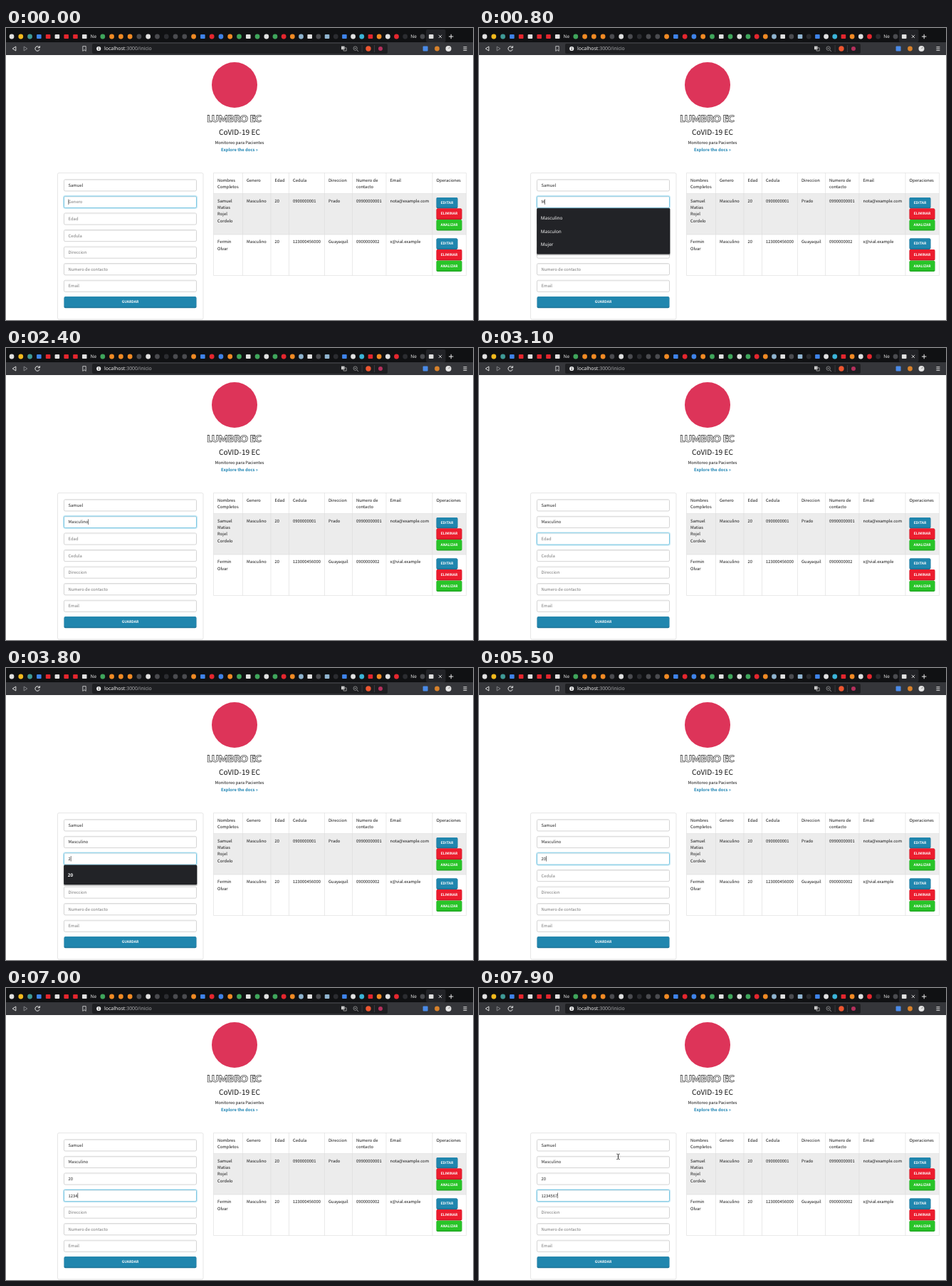
Animation of 656 by 410 pixels, one loop 8000 ms. Source, as an HTML page:

```html
<!DOCTYPE html>
<html lang="es">
<head>
<meta charset="utf-8">
<title>Registro de pacientes</title>
<style>
html, body { margin: 0; width: 100%; height: 100%; overflow: hidden; background: #fff; }
svg { display: block; width: 656px; height: 410px; }
text {
  font: 500 5.85px "Noto Sans CJK SC", "Noto Sans CJK JP", "Noto Sans CJK", Lato, sans-serif;
  text-rendering: geometricPrecision; fill: #111; white-space: pre;
}
.bold { font-weight: 700; }
.mid { text-anchor: middle; }
.ui { font-family: "Noto Sans", sans-serif; font-weight: 400; }
</style>
</head>
<body>
<svg id="stage" viewBox="0 0 656 410"></svg>
<script>
const LOOP = 8000;
const stage = document.getElementById('stage');

function el(tag, attrs, parent = stage) {
  const node = document.createElementNS('http://www.w3.org/2000/svg', tag);
  for (const key in attrs) node.setAttribute(key, attrs[key]);
  parent.appendChild(node);
  return node;
}
const rect = (x, y, width, height, fill, more, parent) =>
  el('rect', { x, y, width, height, fill, ...more }, parent);
const dot = (cx, cy, r, fill) => el('circle', { cx, cy, r, fill });
const path = (d, stroke, more, parent) =>
  el('path', { d, stroke, fill: 'none', 'stroke-width': 1, ...more }, parent);
function label(x, y, str, style = '', cls = '', parent = stage) {
  const node = el('text', { x, y, class: cls, style }, parent);
  node.textContent = str;
  return node;
}

// ---- Browser chrome ----
const tints = {
  w: '#e0e0e0', y: '#f2b91d', t: '#3f9a96', b: '#3f83e8', r: '#e3262e', g: '#3fa55b',
  o: '#f08a24', k: '#4a4b4f', d: '#2b2c30', c: '#3bb4d8', l: '#8fb4cf'
};
const tabs = 'wytbrwrrwNgoookwkdkkobrbogwgwgrolwkldbwcrowrdNkw';
const squares = 'b3,r4,w5,r6,r7,w8,w16,b21,w26,w33,l35,b37,r40,w47'.split(',');

function drawTabs() {
  rect(0, 0, 656, 38, '#101113');
  rect(590, 2, 27.5, 18, '#222327', { rx: 2 });
  [...tabs].forEach((code, i) => {
    const x = i < 29 ? 8 + 12.78 * i : 365.8 + 12.18 * (i - 28);
    if (code === 'N') label(x - 4.5, 14.3, 'Ne', 'font-size:6.5px;fill:#e4e4e4', 'ui');
    else if (squares.includes(code + i)) rect(x - 3.3, 9, 6.6, 6, tints[code], { rx: 1 });
    else dot(x, 12, 3.4, tints[code]);
  });
  path('M607.8 9.8l4.2 4.2m0-4.2l-4.2 4.2', '#ddd', { 'stroke-width': .9 });
  path('M622 12h6.4m-3.2-3.2v6.4', '#eee');
}

function drawToolbar() {
  rect(0, 20, 656, 18, '#35363a');
  rect(121, 22, 415, 14, '#1e1f22', { rx: 2 });
  path('M13.8 26v6l-4.6-3z', '#eee', { 'stroke-width': .9 });
  path('M25.2 26v6l4.6-3z', '#8b8c90', { 'stroke-width': .9 });
  path('M46.8 27.2a3.2 3.2 0 1 0 .4 2.8M47.4 25.2v2.6h-2.6', '#eee');
  path('M107.8 25.6h4.4v6.8l-2.2-1.8-2.2 1.8z', '#ddd', { 'stroke-width': .8 });
  dot(130.2, 29, 3.1, '#eee');
  rect(129.8, 27, .9, .9, '#222');
  rect(129.8, 28.5, .9, 2.5, '#222');
  const url = label(138, 31.3, '', 'font-size:6.95px', 'ui');
  for (const [str, fill] of [['localhost', '#f2f2f2'], [':3000/inicio', '#a9aaad']])
    el('tspan', { style: 'fill:' + fill }, url).textContent = str;

  rect(471, 25.6, 4.6, 4.6, '#ccc');
  path('M474 27.8h4.2v4.2H474z', '#aaa', { 'stroke-width': .8 });
  path('M493 31l2 2M489.4 28.6h2.6', '#aaa', { 'stroke-width': .8 });
  el('circle', { cx: 490.7, cy: 28.6, r: 2.7, fill: 'none', stroke: '#aaa', 'stroke-width': .7 });
  rect(499.8, 24, .5, 10, '#55565a');
  rect(517.2, 24, .5, 10, '#55565a');
  dot(509, 29, 3.7, '#ee5630');
  dot(526, 29, 3, '#b5305d');
  rect(585.6, 25.4, 7, 7, '#4a8be8', { rx: 1 });
  dot(605.5, 29, 3.4, '#d9822b');
  dot(621.5, 29, 4, '#e4e4e4');
  path('M621.5 29l2-2', '#555', { 'stroke-width': .8 });
  for (const y of [26.3, 28.6, 30.9]) rect(642.4, y, 5, .9, '#eee');
}

// ---- Page ----
function drawHeader() {
  dot(321, 80, 32, '#dd3459');
  label(320.5, 131.8, 'LUMBRO EC',
    'font:900 13.2px Lato,sans-serif;fill:#fff;stroke:#111;stroke-width:.6', 'mid');
  label(328, 150.4, 'CoVID-19 EC', 'font-size:10.2px', 'mid');
  label(328, 163.2, 'Monitoreo para Pacientes', '', 'mid');
  label(328, 172.7, 'Explore the docs »', 'fill:#1a82b2', 'mid bold');
}

function button(x, y, w, h, str, fill, edge) {
  rect(x, y, w, h, edge, { rx: 1.8 });
  rect(x + .4, y, w - .8, h - 1.6, fill, { rx: 1.5 });
  label(x + w / 2, y + h / 2 + 1.1, str, 'font-size:4.95px;fill:#fff', 'mid bold');
}

function drawTable() {
  const cols = [291.5, 332.5, 372, 397.5, 447.5, 486.5, 534, 599, 646.5];
  const rows = [203.5, 232.5, 290, 347.5];
  const cells = [
    ['Nombres/Completos', 'Genero', 'Edad', 'Cedula', 'Direccion', 'Numero de/contacto', 'Email', 'Operaciones'],
    ['Samuel/Matias/Rojel/Cordelo', 'Masculino', '20', '0900000001', 'Prado', '09900000001', 'nota@example.com'],
    ['Fermin/Olvar', 'Masculino', '20', '123000456000', 'Guayaquil', '0900000002', 'x@vial.example']
  ];
  rect(291.5, 232.5, 355, 57.5, '#ececec');
  const lines = cols.map(x => `M${x} 203.5V347.5`).concat(rows.map(y => `M291.5 ${y}H646.5`));
  path(lines.join(''), '#dcdcdc', { 'stroke-width': .6 });
  cells.forEach((row, r) => row.forEach((cell, c) =>
    cell.split('/').forEach((str, i) =>
      label(cols[c] + 5.6, rows[r] + 12.1 + 9.4 * i, str))));
  for (const y of [238, 295.5]) {
    button(604.5, y, 30, 15.4, 'EDITAR', '#2086ae', '#1b7397');
    button(604.5, y + 15.6, 36, 15.4, 'ELIMINAR', '#ec1c2e', '#c91625');
    button(604.5, y + 31.2, 36, 15.4, 'ANALIZAR', '#28c428', '#20a823');
  }
}

const fieldY = i => 212.8 + 23.58 * i;
const hints = ['Nombres', 'Genero', 'Edad', 'Cedula', 'Direccion', 'Numero de contacto', 'Email'];

function drawForm() {
  rect(72.5, 203.5, 204.5, 205.5, '#fff', { rx: 2, stroke: '#dcdcdc', 'stroke-width': .7 });
  const fields = hints.map((hint, i) => {
    const y = fieldY(i);
    rect(81.5, y, 186, 16.1, '#fff', { rx: 1.8, stroke: '#c2c2c2', 'stroke-width': .7 });
    const glow = el('g', { opacity: 0 });
    rect(81, y - .5, 187, 17.1, 'none', { rx: 2.4, stroke: '#cdeaf5', 'stroke-width': 2.2 }, glow);
    rect(81.5, y, 186, 16.1, '#fff', { rx: 1.8, stroke: '#6cc1df', 'stroke-width': .9 }, glow);
    rect(82.2, y + .4, 184.6, .9, '#ececec');
    return { glow, text: label(87.6, y + 10.1, hint) };
  });
  button(81.5, 377.3, 186, 16, 'GUARDAR', '#2086ae', '#1b7397');
  return fields;
}

drawTabs();
drawToolbar();
drawHeader();
drawTable();
const fields = drawForm();
const caret = rect(0, 0, .6, 7.6, '#222');

// ---- Suggestion list ----
const ROW = 18.4;
const popup = el('g', {});
const shade = rect(80.8, 1, 188, 0, '#000', { rx: 1.5, opacity: .22 }, popup);
const panel = rect(81.5, 0, 186.5, 0, '#222327', { rx: 1, stroke: '#17181b', 'stroke-width': .6 }, popup);
const options = [0, 1, 2].map(i =>
  label(86.8, 16.1 + ROW * i, '', 'font-size:6.4px;fill:#f8f8f8', 'ui', popup));

const beam = path('M-2.2-3.8q2.2 0 2.2 1.2V2.6q0 1.2-2.2 1.2M2.2-3.8Q0-3.8 0-2.6V2.6Q0 3.8 2.2 3.8',
  '#222', { 'stroke-width': .8 });

// ---- Timeline ----
const focusSteps = [[0, 1], [2600, 2], [5800, 3]];
const typing = {
  1: [[700, 'M'], [900, 'Ma'], [1200, 'Mas'], [1400, 'Masc'], [1600, 'Mascu'],
      [1800, 'Mascul'], [2100, 'Masculi'], [2200, 'Masculin'], [2300, 'Masculino']],
  2: [[3800, '2'], [3900, '20']],
  3: [[6500, '1'], [6700, '12'], [6800, '123'], [7000, '1234'], [7100, '12345'],
      [7400, '123456'], [7600, '1234567']]
};
const lists = [
  [0, ''], [100, 'Masculino/Masculon/Mujer'], [900, 'Masculino/Masculon'],
  [2100, 'Masculino'], [2300, ''], [3800, '20'], [3900, ''],
  [6500, '1239876543210/123000456000'], [7000, '']
];
const caretOff = [[3100, 3600], [4400, 4500], [5000, 5500], [6200, 6500]];
const FADE = 150;

const at = (steps, t) => {
  let value;
  for (const [time, v] of steps) if (time <= t) value = v;
  return value;
};
const clamp = v => Math.max(0, Math.min(1, v));

function glowAt(i, t) {
  const n = focusSteps.findIndex(step => step[1] === i);
  if (n < 0) return 0;
  const start = n ? clamp((focusSteps[n][0] + FADE - t) / FADE) : 0;
  const next = focusSteps[n + 1];
  const end = next ? clamp((t - next[0]) / FADE) : 0;
  return Math.min(1 - start, 1 - end);
}

function draw(t) {
  const focus = at(focusSteps, t);
  fields.forEach(({ glow, text }, i) => {
    const value = i ? at(typing[i] || [], t) : 'Samuel';
    const shown = value || hints[i];
    if (text.textContent !== shown) text.textContent = shown;
    text.style.fill = value ? '#222' : '#777';
    glow.setAttribute('opacity', glowAt(i, t));
    if (i === focus) {
      caret.setAttribute('x', 87.6 + (value ? text.getComputedTextLength() : 0));
      caret.setAttribute('y', fieldY(i) + 4);
    }
  });
  const hidden = caretOff.some(([from, to]) => t >= from && t < to);
  caret.setAttribute('opacity', hidden ? 0 : 1);

  const list = at(lists, t);
  popup.setAttribute('visibility', list ? 'visible' : 'hidden');
  if (list) {
    const items = list.split('/');
    const height = 8.7 + ROW * items.length;
    panel.setAttribute('height', height);
    shade.setAttribute('height', height + 1);
    popup.setAttribute('transform', `translate(0 ${fieldY(focus) + 16.9})`);
    options.forEach((node, i) => {
      node.textContent = items[i] || '';
      node.style.fontWeight = list === '20' ? 700 : 500;
    });
  }

  beam.setAttribute('opacity', t < 7800 ? 0 : 1);
  beam.setAttribute('transform', t < 7900 ? 'translate(201.3 232.2)' : 'translate(195.5 236.8)');
}

function tick() {
  draw(performance.now() % LOOP);
  requestAnimationFrame(tick);
}
tick();
</script>
</body>
</html>
```
